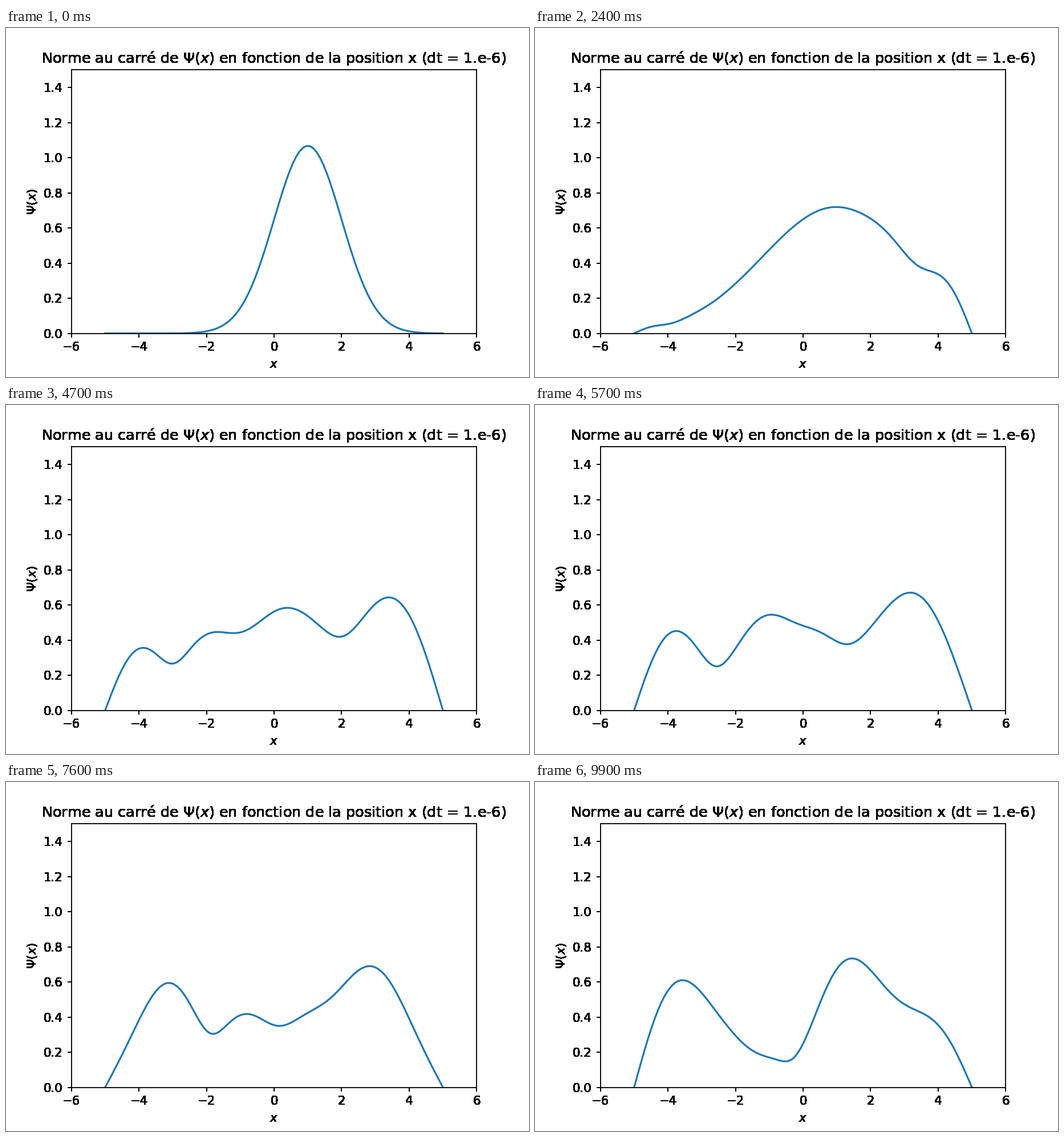
These frames come from a looping animation (917x611 px, 10 s). A matplotlib script:

```python
import numpy as np
import matplotlib.pyplot as plt
from matplotlib.animation import FuncAnimation

WIDTH, HEIGHT, DPI = 917, 611, 152.75
FRAMES, INTERVAL = 100, 100

# Free Gaussian packet in a box with hard walls at x = -5 and x = 5
N = 100
H = 0.1              # grid step used in the finite differences
T_FRAME = 0.08       # simulated time per frame

x = np.linspace(-5, 5, N)
psi0 = np.exp(-(x - 1) ** 2 / 2)
psi0 *= np.sqrt(2 / (H * np.sum(psi0 ** 2)))

# Exact evolution in the sine modes of the discrete Laplacian
cells = N - 1
n = np.arange(1, cells)
modes = np.sin(np.pi * np.outer(np.arange(N), n) / cells)
coeffs = 2 / cells * modes.T @ psi0
energy = (1 - np.cos(np.pi * n / cells)) / H ** 2


def amplitude(t):
    return np.abs(modes @ (coeffs * np.exp(-1j * energy * t)))


def harden_labels(fig):
    """Give everything outside the axes hard edges by dropping its alpha."""
    fig.patch.set_alpha(0)
    fig.canvas.draw()
    rgb = np.array(fig.canvas.buffer_rgba())[..., :3]
    fig.patch.set_alpha(1)
    fig.figimage(rgb, zorder=-1)


plt.rcParams["font.family"] = "DejaVu Sans"
# The tiny margin keeps the pixel size from rounding down
fig, ax = plt.subplots(
    figsize=((WIDTH + 1e-6) / DPI, (HEIGHT + 1e-6) / DPI),
    dpi=DPI, facecolor="white")
fig.subplots_adjust(left=0.125, right=0.9, bottom=0.125, top=0.88)

ax.set_xlim(-6, 6)
ax.set_ylim(0, 1.5)
ax.set_xticks(np.arange(-6, 7, 2))
ax.set_yticks(np.arange(0, 1.5, 0.2))
ax.set_xlabel("$x$", labelpad=4.5)
ax.set_ylabel(r"$\Psi(x)$", labelpad=3.5)
ax.set_title(r"Norme au carré de $\Psi(x)$ en fonction de la position x"
             " (dt = 1.e-6)")
line, = ax.plot(x, amplitude(0), color="#1f77b4", lw=1.5)
harden_labels(fig)


def update(i):
    line.set_ydata(amplitude(i * T_FRAME))
    return line,


anim = FuncAnimation(fig, update, frames=FRAMES, interval=INTERVAL,
                     repeat=True, repeat_delay=0)
plt.show()
```
